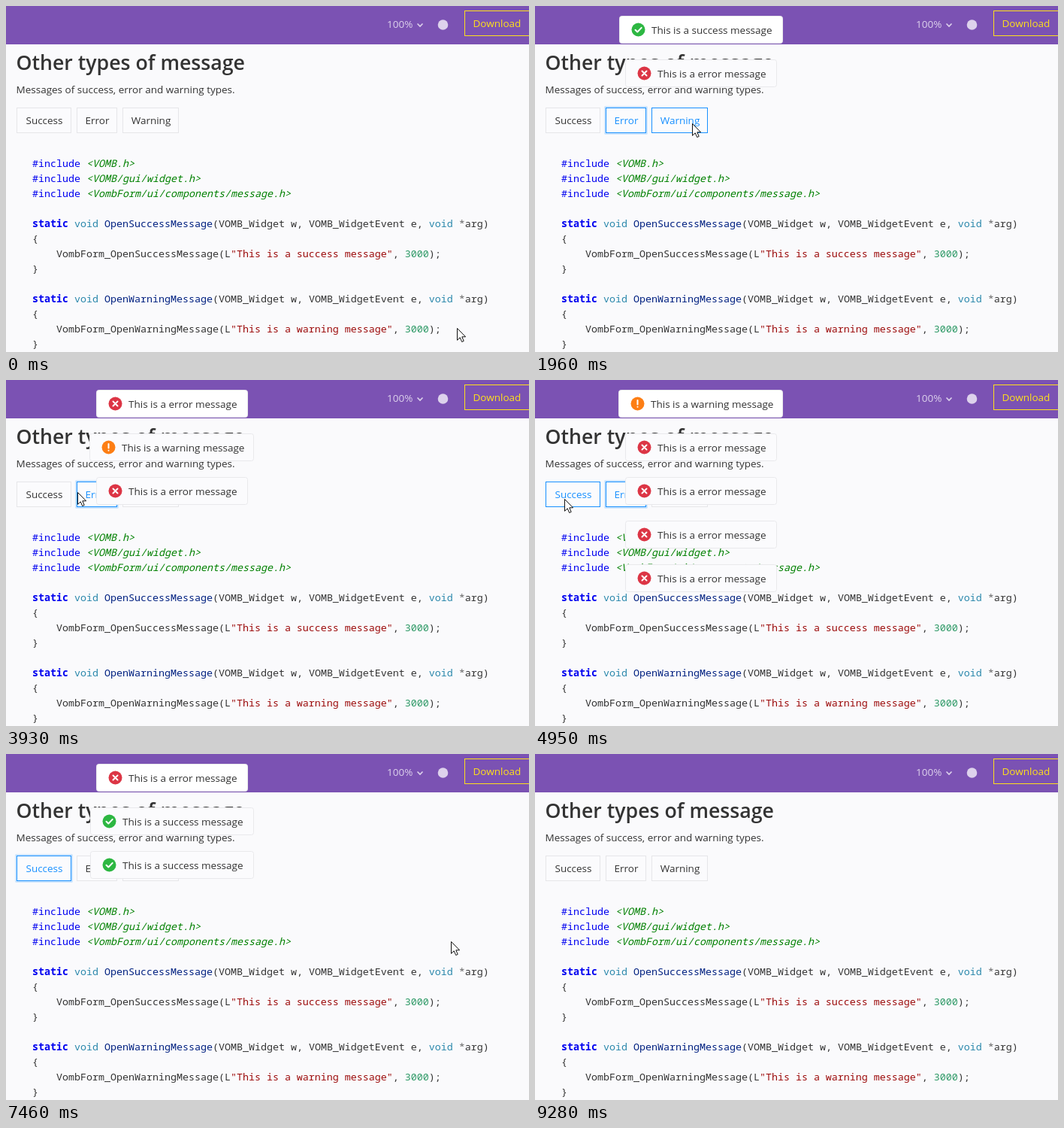
An HTML page for the animation above (9750 ms loop, 696 by 460 pixels).

```html
<!DOCTYPE html>
<html lang="en">
<head>
<meta charset="utf-8">
<title>Message types</title>
<style>
  html, body { margin: 0; width: 100%; height: 100%; overflow: hidden; background: #fafafc; }
  svg { display: block; width: 696px; height: 460px; }
  text { font: 13.5px "Open Sans", "Noto Sans", sans-serif; fill: #333; white-space: pre; }
  .title { font-size: 26.7px; font-weight: 600; }
  .nav { fill: #ddd2ec; }
  .gold { fill: #ffe01a; }
  .code text { font: 13.333px "Noto Sans Mono", monospace; }
  .key { fill: #0000f0; }
  .bold { fill: #0000f0; font-weight: 700; }
  .path { fill: #008000; font-style: italic; }
  .type { fill: #2b88ac; }
  .fn { fill: #002080; }
  .str { fill: #9c0b0b; }
  .num { fill: #2e9966; }
  .op { fill: #666; }
  .box { fill: #fbfbfd; stroke: #e6e6e9; }
  .ring { fill: none; stroke: #1890ff; stroke-opacity: .2; stroke-width: 2; visibility: hidden; }
  .on .box { stroke: #1890ff; }
  .on text { fill: #1890ff; }
  .focus .ring { visibility: visible; }
  .card { fill: #fbfbfd; stroke: #e9e9ec; }
  .top .card { fill: #fff; }
  .mark { fill: none; stroke: #fff; stroke-width: 2; stroke-linecap: round; stroke-linejoin: round; }
</style>
</head>
<body>
<svg viewBox="0 0 696 460">
  <rect width="696" height="51" fill="#7b52b3"/>
  <text class="nav" x="507" y="29">100%</text>
  <path d="M547.5 23.5l3.5 3.5 3.5-3.5" fill="none" stroke="#ddd2ec" stroke-width="1.6"/>
  <circle cx="581.5" cy="25" r="6.8" fill="#ddd2ec"/>
  <rect x="610.5" y="6.5" width="100" height="33" fill="none" stroke="#ffe01a"/>
  <text class="gold" x="621.5" y="28">Download</text>
  <text class="title" x="13.5" y="85">Other types of message</text>
  <text x="13.5" y="116">Messages of success, error and warning types.</text>
  <g id="buttons"></g>
  <g id="code" class="code"></g>
  <g id="messages"></g>
  <path id="cursor" d="M.5.5V16.3L4.2 12.8 6.7 18.5 9.2 17.4 6.8 11.8H11.6Z" fill="#fff" stroke="#111"/>
</svg>
<script>
const LOOP = 9750;
const TICK = LOOP / 124;   // the screen is sampled at this interval
const LIFE = 3000;         // how long a message stays
const PRESS = 90;          // a button takes focus this long before its message
const BLUR = 7850;

const $ = id => document.getElementById(id);

function el(tag, attrs, parent, text) {
  const node = document.createElementNS('http://www.w3.org/2000/svg', tag);
  for (const name in attrs) node.setAttribute(name, attrs[name]);
  if (text) node.textContent = text;
  parent.append(node);
  return node;
}

// Code listing: plain strings, or [class, text]
const include = path => [['key', '#include '], ['path', `<${path}>`]];
const handler = kind => [
  [['bold', 'static'], ' ', ['type', 'void'], ' ', ['fn', `Open${kind}Message`],
    '(VOMB_Widget w, VOMB_WidgetEvent e, ', ['type', 'void'], ' ', ['op', '*'], 'arg)'],
  ['{'],
  [`    VombForm_Open${kind}Message(L`, ['str', `"This is a ${kind.toLowerCase()} message"`],
    ', ', ['num', '3000'], ');'],
  ['}']
];
const listing = [
  include('VOMB.h'), include('VOMB/gui/widget.h'), include('VombForm/ui/components/message.h'), [],
  ...handler('Success'), [], ...handler('Warning')
];
listing.forEach((line, i) => {
  const row = el('text', { x: 35, y: 214 + i * 20 }, $('code'));
  for (const part of line) {
    if (typeof part === 'string') el('tspan', {}, row, part);
    else el('tspan', { class: part[0] }, row, part[1]);
  }
});

function button(name, x, w) {
  const node = el('g', {}, $('buttons'));
  el('rect', { class: 'ring', x: x - 1, y: 134, width: w + 2, height: 36, rx: 1 }, node);
  el('rect', { class: 'box', x: x + .5, y: 135.5, width: w - 1, height: 33 }, node);
  el('text', { x: x + w / 2 + .5, y: 157, 'text-anchor': 'middle' }, node, name);
  return { name, x, w, node };
}
const buttons = [button('Success', 14, 73), button('Error', 94, 54), button('Warning', 155, 75)];

const kinds = {
  Success: { x: 112, w: 218, color: '#2db742', mark: 'M-4 .2L-1.2 3 4.2-2.6' },
  Error: { x: 120, w: 202, color: '#dc3545', mark: 'M-3-3L3 3M3-3L-3 3' },
  Warning: { x: 111, w: 219, color: '#fd7e14', mark: 'M0-4.5V1M0 4.2V4.3' }
};

function message(kind, shown) {
  const { x, w, color, mark } = kinds[kind];
  const node = el('g', {}, $('messages'));
  el('rect', { class: 'card', x: x + .5, y: .5, width: w - 1, height: 36, rx: 3 }, node);
  const icon = el('g', { transform: `translate(${x + 25.5} 18.5)` }, node);
  el('circle', { r: 9, fill: color }, icon);
  el('path', { class: 'mark', d: mark }, icon);
  el('text', { x: x + 43, y: 24 }, node, `This is a ${kind.toLowerCase()} message`);
  return { kind, shown, node };
}
const messages = [
  message('Success', 770),
  message('Error', 1710),
  message('Warning', 2420),
  ...[3900, 4160, 4440, 4712].map(t => message('Error', t)),
  ...[5140, 5340].map(t => message('Success', t))
];

// Pointer moves; dip bows the path downwards
const move = (from, to, x, y, dip = 0) => ({ from, to, x, y, dip });
const moves = [
  move(0, 545, 62, 157, -45),
  move(1260, 1490, 124, 156),
  move(1810, 1960, 209, 156),
  move(2125, 2275, 202, 157),
  move(2830, 3535, 95, 149, 105),
  move(4796, 4950, 39, 158),
  move(5740, 6050, 592, 249),
  move(8650, 9270, 618, 470)
];

function pointerAt(t) {
  let x = 600, y = 428;
  for (const m of moves) {
    if (t < m.from) break;
    const p = Math.min(1, (t - m.from) / (m.to - m.from));
    const u = p * p * (3 - 2 * p);
    x += (m.x - x) * u;
    y += (m.y - y) * u + 4 * m.dip * u * (1 - u);
  }
  return [Math.round(x), Math.round(y)];
}

function render(t) {
  const [x, y] = pointerAt(t);
  $('cursor').setAttribute('transform', `translate(${x} ${y})`);

  const focused = t < BLUR && messages.findLast(m => t >= m.shown - PRESS)?.kind;
  for (const b of buttons) {
    const hover = x >= b.x && x < b.x + b.w && y >= 135 && y < 169;
    const active = b.name === focused;
    b.node.setAttribute('class', (hover || active ? 'on ' : '') + (active ? 'focus' : ''));
  }

  let row = 0;
  for (const m of messages) {
    const visible = t >= m.shown && t < m.shown + LIFE;
    m.node.style.display = visible ? '' : 'none';
    if (!visible) continue;
    m.node.setAttribute('class', row ? '' : 'top');
    m.node.setAttribute('transform', `translate(0 ${13 + 58 * row++})`);
  }
}

const start = performance.now();
function frame() {
  const t = (performance.now() - start) % LOOP;
  render(Math.floor((t + 12) / TICK) * TICK);
  requestAnimationFrame(frame);
}
frame();
</script>
</body>
</html>
```
